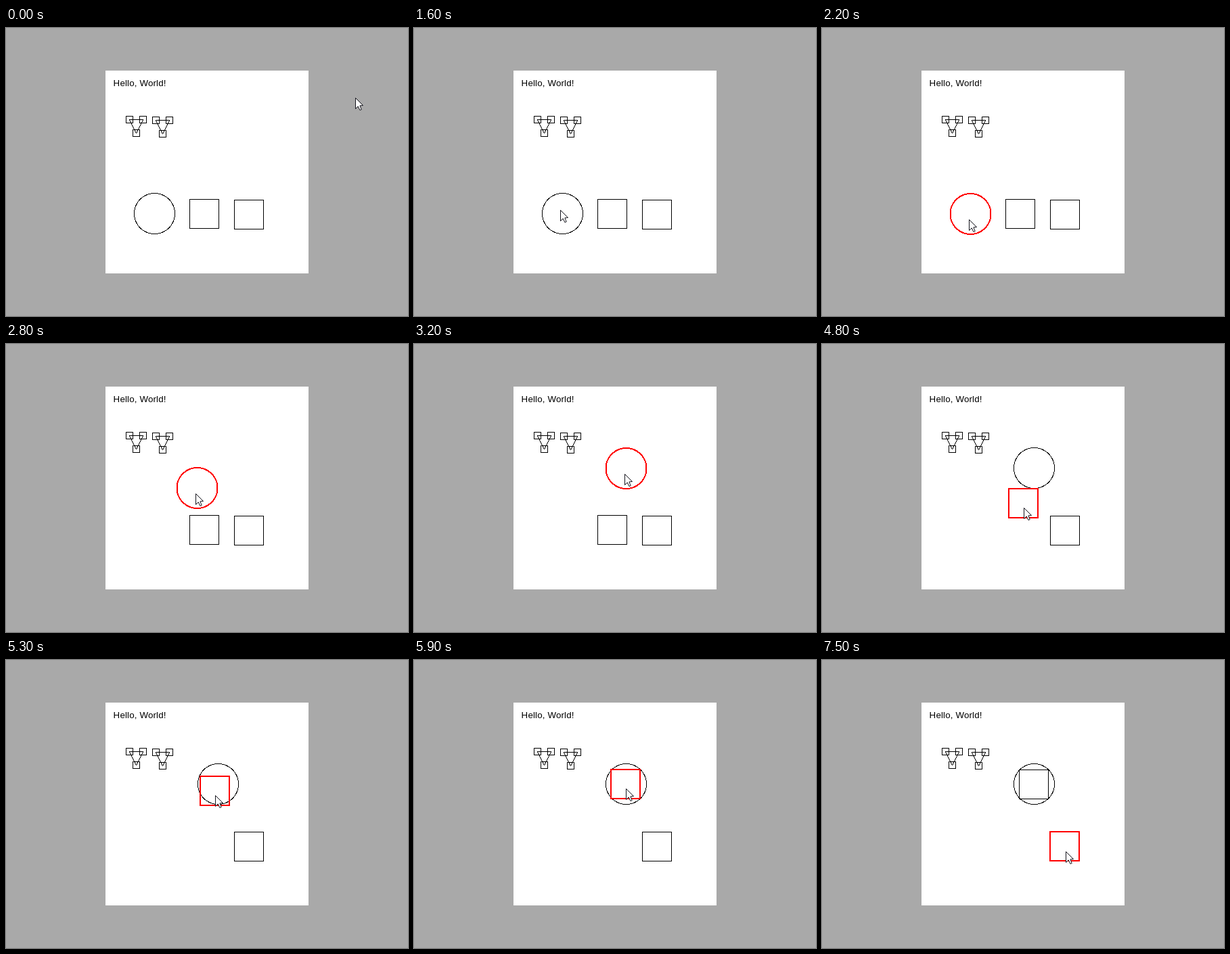
These frames come from a looping animation (594x426 px, 8 s). An HTML page with a canvas:

```html
<!DOCTYPE html>
<html lang="en">
<head>
<meta charset="utf-8">
<title>Dragging shapes</title>
<style>
  html, body { margin: 0; width: 100%; height: 100%; overflow: hidden; background: #a9a9a9; }
  canvas { display: block; }
</style>
</head>
<body>
<canvas id="stage" width="594" height="426"></canvas>
<script>
const ctx = document.getElementById('stage').getContext('2d');
const LOOP = 8000, STEP = 100;
const RED = '#f00', BLACK = '#000';

// Where the pointer goes, and when it sets off and arrives
const home = { x: 516, y: 103 };
const stops = [
  { start: 800, end: 1600, x: 216, y: 269 },
  { start: 1800, end: 2200, x: 217, y: 283 },
  { start: 2400, end: 3200, x: 311, y: 192 },
  { start: 3300, end: 3600, x: 298, y: 283 },
  { start: 4000, end: 4200, x: 293, y: 281 },
  { start: 4500, end: 4800, x: 298, y: 242 },
  { start: 4800, end: 5600, x: 313, y: 190 },
  { start: 6300, end: 6800, x: 360, y: 283 }
];

const clamp = (v, lo, hi) => Math.min(hi, Math.max(lo, v));
const easeOut = u => 1 - Math.pow(1 - u, 1.63);

function pointerAt(t) {
  let { x, y } = home;
  for (const stop of stops) {
    const k = easeOut(clamp((t - stop.start) / (stop.end - stop.start), 0, 1));
    x += (stop.x - x) * k;
    y += (stop.y - y) * k;
  }
  return { x: Math.floor(x + 1e-6), y: Math.floor(y + 1e-6) };
}

// A dragged shape follows the pointer between grab and drop
function dragged(t, grab, drop, dx, dy) {
  const p = pointerAt(clamp(t, grab, drop));
  return [p.x + dx, p.y + dy];
}

function box(x, y, size, selected) {
  const shift = selected ? 0 : 0.5;
  ctx.strokeStyle = selected ? RED : BLACK;
  ctx.lineWidth = selected ? 2 : 1;
  ctx.strokeRect(x + shift, y + shift, size, size);
}

// Hard-edged ring, without antialiasing
function circle(x, y, selected) {
  const r = 30, half = selected ? 1 : 0.5;
  const drop = selected ? 0.5 : 0;
  ctx.fillStyle = selected ? RED : BLACK;
  for (let dy = -r - 2; dy <= r + 2; dy++) {
    for (let dx = -r - 2; dx <= r + 2; dx++) {
      if (Math.abs(Math.hypot(dx, dy - drop) - r) < half) ctx.fillRect(x + dx, y + dy, 1, 1);
    }
  }
}

function triangle(x, y) {
  ctx.fillStyle = BLACK;
  ctx.fillRect(x, y, 21, 1);
  for (let i = 0; i <= 20; i++) {
    const dx = Math.floor(i / 2);
    ctx.fillRect(x + dx, y + i, 1, 1);
    ctx.fillRect(x + 20 - dx, y + i, 1, 1);
  }
  for (const [dx, dy] of [[0, 0], [20, 0], [10, 20]]) box(x + dx - 5, y + dy - 5, 10, false);
}

const arrow = new Path2D('M.5 .5V16.5L4.2 12.9L6.9 18.5L9.2 17.6L6.9 11.9L11.5 11.5Z');

function pointer({ x, y }) {
  ctx.save();
  ctx.translate(x, y);
  ctx.fillStyle = '#fff';
  ctx.fill(arrow);
  ctx.strokeStyle = '#14141c';
  ctx.lineWidth = 1;
  ctx.stroke(arrow);
  ctx.restore();
}

function draw(time) {
  const t = Math.floor((time % LOOP) / STEP) * STEP;

  ctx.fillStyle = '#a9a9a9';
  ctx.fillRect(0, 0, 594, 426);
  ctx.fillStyle = '#fff';
  ctx.fillRect(147, 63, 300, 300);

  ctx.fillStyle = BLACK;
  ctx.font = '13.33px "Liberation Sans", Arial, sans-serif';
  ctx.letterSpacing = '0.15px';
  ctx.fillText('Hello, World!', 158.6, 86);

  triangle(182, 135);
  triangle(221, 136);
  circle(...dragged(t, 2200, 3200, 2, -9), t >= 1800 && t < 3800);
  box(...dragged(t, 4500, 5600, -22, -28), 43, t >= 3800 && t < 7500);
  box(337, 254, 43, t >= 7500);
  pointer(pointerAt(t));
}

const began = performance.now();
function tick() {
  draw(performance.now() - began);
  requestAnimationFrame(tick);
}
tick();
</script>
</body>
</html>
```
